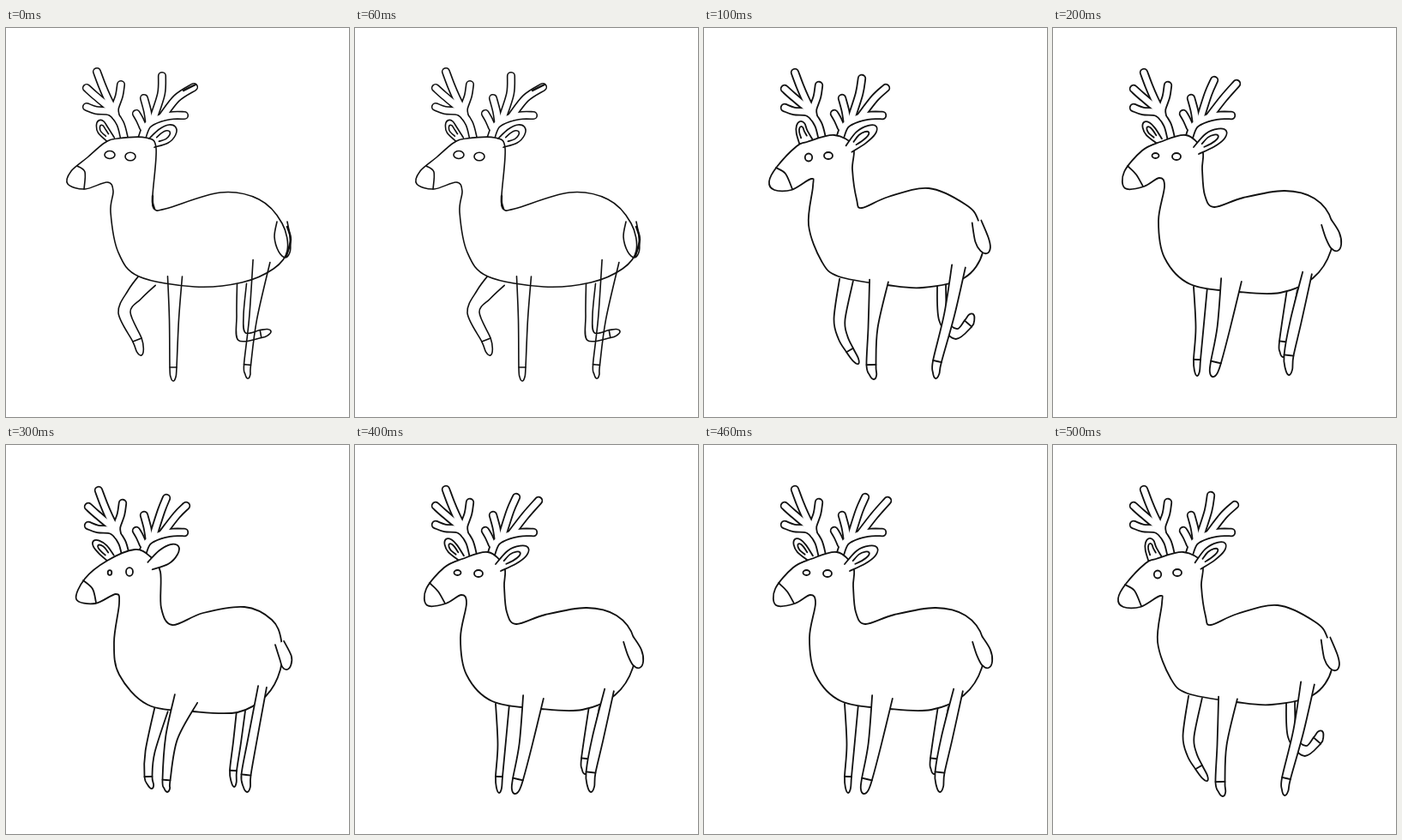
These frames come from a looping animation (400x454 px, 0.6 s). An HTML page:

```html
<!DOCTYPE html>
<html lang="en">
<head>
<meta charset="utf-8">
<title>Deer</title>
<style>
html, body { margin: 0; width: 100%; height: 100%; overflow: hidden; background: #fff; }
svg { display: block; width: 400px; height: 454px; fill: #fff; stroke: #111; stroke-linecap: round; stroke-linejoin: round; }
g { visibility: hidden; }
g.on { visibility: visible; }
.bare { fill: none; }
</style>
</head>
<body>
<svg viewBox="0 0 400 454"></svg>
<script>
// Limbs, ears and tail: a centre line of "x,y,halfWidth" that ends in a tip "x,y".
const lifted = {
  line: 1.6, see: true, left: [0, -1], tips: ['182,56', '219,69'],
  ears: ['123,131,4.5 113,119,6.5 108,108', '170,134,6 184,126,9.5 198,116'],
  eyes: [[121, 148, 6, 4.5], [145, 150, 6, 4.8]],
  body: '115,134 130,129 163,128 175,140 171,196 173,211 186,211 250,192 295,200 322,228 328,260 312,281 275,297 220,302 155,290 131,262 122,215 125,190 118,180 92,188 72,182 76,167 95,151',
  nose: '83,161 92,168 91,188',
  tail: '322,226,6 322,243,9 326,268',
  far: ['166,293,11 150,311,9 138,332,7 153,364,5.5 158,382', '275,298,5.5 273,335,4 275,360,6 297,357,4.5 309,354'],
  near: ['197,290,8.5 196,340,5.5 195,396,4 195,412', '298,272,10 288,340,4.5 281.5,393,4 282,409'],
  bold: ['171,196 171,204 173,211', '328,232 332,247 327,266', '207,73 221,66']
};
const stepping = {
  line: 1.8, left: [0, 0], tips: ['184,59', '212,70'],
  ears: ['119,133,8 114,121,6.5 112,109', '169,141,5 183,128,8.5 201,115'],
  eyes: [[122, 151, 4.2, 4.5], [145, 149, 5, 4]],
  body: '120,133 152,125 174,138 173,165 178,200 184,210 215,197 262,187 305,206 320,225 325,262 303,292 255,303 214,300 157,290 137,272 122,230 127,185 125,176 102,189 82,189 76,179 85,162 108,138',
  nose: '84,163 95,170 103,188',
  tail: '318,226,5.5 324,247,8 330,263',
  far: ['166,294,8 158,340,6.5 162,361,5.5 170,376,4.5 180,392', '277,296,5 279,340,5 294,357,6 308,345,5.5 314,334'],
  near: ['204,295,11 197,350,5.5 195,393,5.5 198,410', '297,278,8 286,335,6 272,389,5 270,409']
};
const planting = {
  line: 1.8, left: [0, 0], tips: ['188,61', '214,65'],
  ears: ['124,132,4 114,121,6.5 106,110', '167,143,5 183,131,9 202,120'],
  eyes: [[119.5, 149, 4, 3], [144, 150, 5, 4]],
  body: '125,133 155,125 174,142 174,165 177,195 188,209 222,198 270,190 305,199 325,225 324,260 303,292 265,309 217,308 160,299 130,268 123,225 130,185 124,175 106,185 84,187 83,168 104,143',
  nose: '87,161 97,171 105,185',
  tail: '319,227,6.5 326,242,8.5 332,260',
  far: ['172,302,8 171,350,4.5 168,387,4 168,406', '279,305,6 269,366,5 268,384'],
  near: ['208,294,12 199,350,7.5 190,390,6 186,407', '296.5,286,5.5 283,343,6.5 275,382,5.5 275,405']
};
const standing = {
  line: 1.8, left: [2, 1], tips: ['187,62', '210,71'],
  ears: ['122,132,5 113,122,6.5 102,112', '168,141,5 184,131,9.5 201,118'], plainEar: true,
  eyes: [[121, 149, 2.3, 2.8], [144, 148, 4, 4.8]],
  body: '118,135 150,122 168,130 180,148 181,190 194,210 230,196 278,189 310,204 321,228 320,262 303,293 270,312 218,311 165,303 132,268 126,230 132,185 128,174 104,185 82,180 92,156',
  nose: '90,158 101,168 105,184',
  tail: '319,231,5.5 326,248,7 328,262',
  far: ['181,309,8 168,358,5.5 166,387,4.5 170,401', '274,310,5 269.5,347,4.5 265,380,4 266,399'],
  near: ['210,296,14 193,342,7 187,391,4.5 188,405', '299,282,5 287,346,5.3 280,385,5.5 281,405']
};

const leftAntler = ['94,93 105,97 122,99 133,112 138,130', '94,71 104,80 122,95',
  '106,52 112,68 118,82 126,98', '134,67 132,80 127,95 128,104'];
const rightAntler = (top, side) => ['208,102 195,102 180,105 165,113 158,130', '152,100 156,107 160,116',
  '161,82 165,97 167,110', `${top} 181,77 172,105`, `${side} 199,82 182,104`];

const parse = text => text.split(' ').map(s => s.split(',').map(Number));
const mix = (a, b, t) => a.map((v, i) => v + (b[i] - v) * t);

// Catmull-Rom spline through the points, as Bézier segments.
function curve(p, closed) {
  const n = p.length;
  const at = i => closed ? p[(i + n) % n] : p[Math.max(0, Math.min(n - 1, i))];
  let d = `M${p[0].slice(0, 2)}`;
  for (let i = 0; i < n - !closed; i++) {
    const [a, b, c, e] = [-1, 0, 1, 2].map(k => at(i + k));
    const bend = (from, to, end, sign) => [0, 1].map(k => end[k] + sign * (to[k] - from[k]) / 6);
    d += `C${bend(a, c, b, 1)} ${bend(b, e, c, -1)} ${c.slice(0, 2)}`;
  }
  return d;
}

const path = (d, attrs = '') => `<path ${attrs} d="${d}"/>`;

// Outline around a centre line, open at the root; a hoof adds a line across.
function tube(p, { hoof, bare } = {}) {
  const tip = p[p.length - 1];
  const left = [], right = [];
  p.slice(0, -1).forEach(([x, y, w], i) => {
    const a = p[Math.max(0, i - 1)], b = p[i + 1];
    const dx = b[0] - a[0], dy = b[1] - a[1], k = w / Math.hypot(dx, dy);
    left.push([x + dy * k, y - dx * k]);
    right.push([x - dy * k, y + dx * k]);
  });
  const ends = [left, right].map(side => side[side.length - 1]);
  const mid = mix(...ends, 0.5);
  const [l, r] = ends.map(e => mix(mix(mid, e, 0.75), mix(tip, e, 0).map((v, i) => v + (e[i] - mid[i]) * 0.75), 0.7));
  const attrs = bare ? 'class="bare"' : '';
  return path(curve([...left, l, tip, r, ...right.reverse()]), attrs) + (hoof ? path(curve(ends)) : '');
}

function ear(text, plain, bare) {
  const p = parse(text);
  const inner = p.map(q => mix(p[1], q, 0.5)).map((q, i) => i < 2 ? [q[0], q[1], p[i][2] * 0.45] : q);
  return tube(p, { bare }) + (plain ? '' : tube(inner, { bare }));
}

// Wide dark strokes with narrower white ones on top leave one joined outline.
function antler(tines, line, [dx, dy] = [0, 0]) {
  const layer = (width, colour) => tines.map(t =>
    path(curve(parse(t)), `class="bare" stroke="${colour}" stroke-width="${width}" transform="translate(${dx} ${dy})"`)).join('');
  return layer(8.6 + line, '#111') + layer(8.6 - line, '#fff');
}

function drawPose(s) {
  const bare = s.see;
  const legs = list => list.map(t => tube(parse(t), { hoof: true, bare })).join('');
  return `<g stroke-width="${s.line}">` +
    antler(leftAntler, s.line, s.left) + antler(rightAntler(...s.tips), s.line) +
    ear(s.ears[0]) + legs(s.far) +
    path(curve(parse(s.body), true), bare ? 'fill-opacity="0.999"' : '') +
    path(curve(parse(s.nose)), 'class="bare"') +
    tube(parse(s.tail), { bare }) + legs(s.near) + ear(s.ears[1], s.plainEar, bare) +
    s.eyes.map(([x, y, rx, ry]) => `<ellipse cx="${x}" cy="${y}" rx="${rx}" ry="${ry}"/>`).join('') +
    (s.bold || []).map(t => path(curve(parse(t)), 'class="bare" stroke-width="2.4"')).join('') + '</g>';
}

const svg = document.querySelector('svg');
svg.innerHTML = [lifted, stepping, planting, standing].map(drawPose).join('');
const groups = [...svg.children];
const order = [0, 1, 2, 3, 2, 1];
const start = performance.now();

function show(now) {
  const step = Math.floor(Math.max(0, now - start) / 100) % order.length;
  groups.forEach((g, i) => g.classList.toggle('on', i === order[step]));
  requestAnimationFrame(show);
}
show(start);
</script>
</body>
</html>
```
